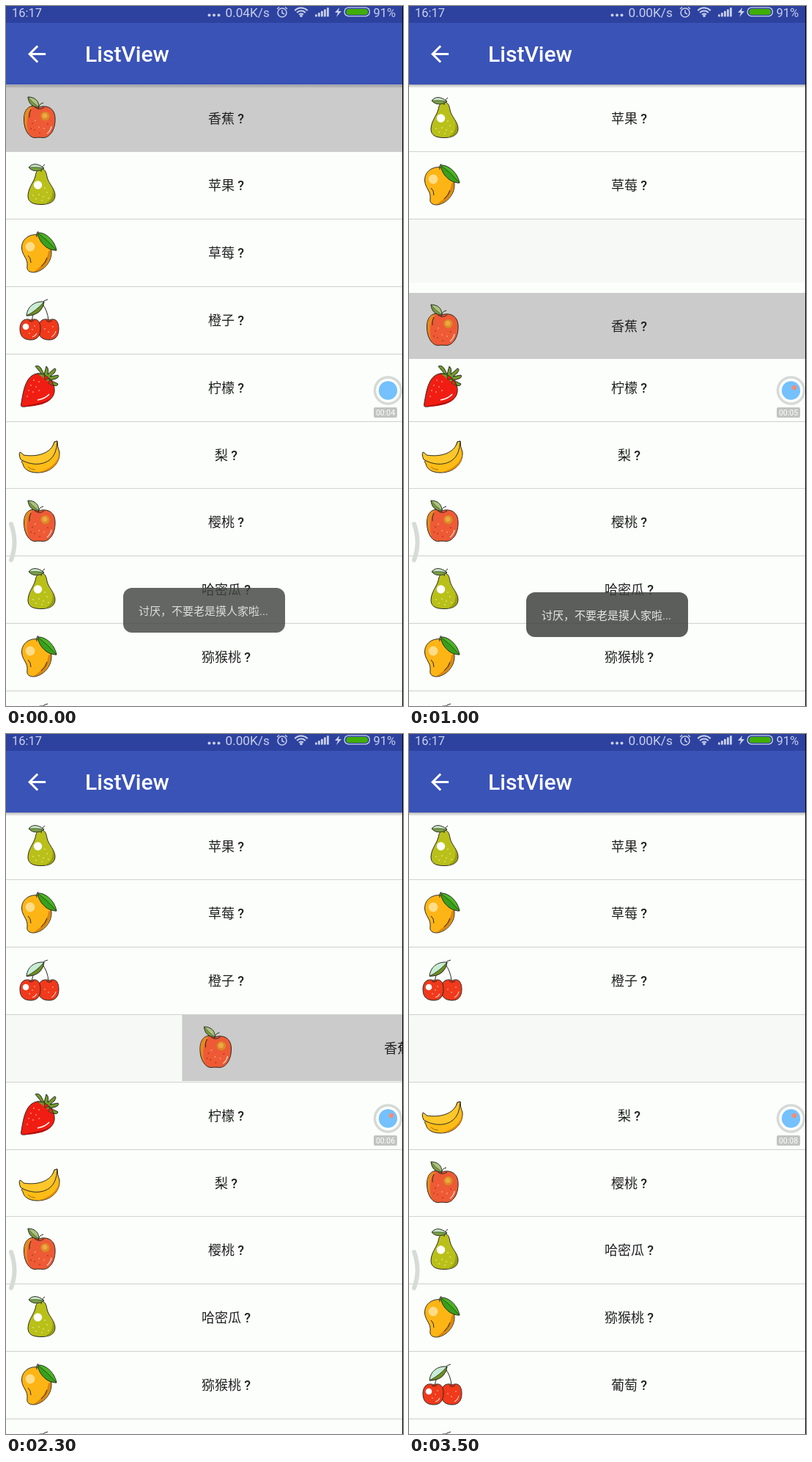
These frames come from a looping animation (542 px wide and 954 px high, 3.6 s). An HTML page with a canvas:

```html
<!DOCTYPE html>
<html lang="zh">
<head>
<meta charset="utf-8">
<style>
html, body { margin: 0; width: 542px; height: 954px; overflow: hidden; background: #f7f9f7; }
canvas { display: block; }
</style>
</head>
<body>
<canvas id="stage" width="542" height="954"></canvas>
<script>
const ctx = document.getElementById('stage').getContext('2d');
const LOOP = 3600, STEP = 100, WIDTH = 541, ROW = 91.8, TOP = 107;
const INK = '#2b2a22', PAPER = '#fcfefc', PRESSED = '#cacbca', STATUS = '#c9cfea';
const CJK = '"Noto Sans CJK SC", "Noto Sans CJK", sans-serif';

const clamp = u => Math.max(0, Math.min(1, u));
const ease = u => (1 - Math.cos(Math.PI * clamp(u))) / 2;
const progress = (t, start, length) => clamp((t - start) / length);
const slide = (t, start) => ease(progress(t, start, 250));

function keyframes(t, keys) {
  for (let i = 1; i < keys.length; i++) {
    const [t0, a] = keys[i - 1], [t1, b] = keys[i];
    if (t <= t1) return a + (b - a) * (t - t0) / (t1 - t0);
  }
  return keys[keys.length - 1][1];
}

function rect(x, y, w, h, color) {
  ctx.fillStyle = color;
  ctx.fillRect(x, y, w, h);
}

function pill(x, y, w, h, r, color) {
  ctx.beginPath();
  ctx.roundRect(x, y, w, h, r);
  ctx.fillStyle = color;
  ctx.fill();
}

function shape(d, fill, stroke = INK, width = 1) {
  const path = new Path2D(d);
  if (fill) {
    ctx.fillStyle = fill;
    ctx.fill(path);
  }
  if (stroke) {
    ctx.strokeStyle = stroke;
    ctx.lineWidth = width;
    ctx.stroke(path);
  }
}

function disc(x, y, r, fill, stroke, width = 1) {
  ctx.beginPath();
  ctx.arc(x, y, r, 0, 7);
  if (fill) {
    ctx.fillStyle = fill;
    ctx.fill();
  }
  if (stroke) {
    ctx.strokeStyle = stroke;
    ctx.lineWidth = width;
    ctx.stroke();
  }
}

function dots(color, ...points) {
  for (const [x, y] of points) disc(x, y, 0.8, color);
}

function text(s, x, y, font, color, align = 'left') {
  ctx.font = font;
  ctx.fillStyle = color;
  ctx.textAlign = align;
  ctx.fillText(s, x, y);
}

// Fruit pictures, with y measured from the top of the row.
function apple() {
  shape('M45 31C37 27 25 29 24.5 46C24 62 32 73 40 72.5C43 72 47 72 50 72.5C60 73 68 61 67 45C66 30 53 28 45 31Z', '#ee5a35');
  shape('M36 30.5C29 30 25 37 25 46C25 55 28 63 31 66C27 56 28 40 36 30.5Z', '#e58a22', null);
  shape('M34 34Q31 39 32 45M39 30.5Q45 36 52 31', null);
  shape('M44 33Q45 26 51 25', null);
  shape('M30 17C38 17 45 21 45 31C36 31 31 26 30 17Z', '#a9c47c');
  shape('M30 17Q36 25 45 31C37 31 31 26 30 17Z', '#7d9a45', INK, 0.6);
  disc(53.5, 43, 6.2, '#d98a25');
  disc(53, 42.5, 3.5, '#efa745');
  shape('M56 67Q61 63 62 57', null, '#ffd9cc', 1.3);
  dots('#8d2a18', [36, 53], [39, 62], [34, 60], [46, 66], [57, 54]);
  dots('#ffc0a0', [40, 49], [45, 58], [52, 60]);
}

function pear() {
  shape('M48 24C43 24 41 28 40 34C38 42 30 50 30 61C30 70 38 72.5 48 72.5C59 72.5 67 69 67 60C67 51 58 44 56 35C55 28 53 24 48 24Z', '#b9c019');
  shape('M63 50C70 62 65 72 51 72C62 69 65 61 63 50Z', '#969c10', null);
  shape('M48 28Q48 21 53 18', null);
  shape('M31 22C36 16 43 16 52 23C45 28 36 28 31 22Z', '#c9e8c6');
  shape('M31 22Q42 21 52 23C45 28 36 28 31 22Z', '#77a044', INK, 0.6);
  disc(43.5, 46, 5.7, '#ffffff');
  dots('#f2f3ae', [45, 59], [51, 62], [56, 56], [58, 64], [49, 67], [41, 65], [53, 50], [37, 60]);
}

function mango() {
  shape('M44 22C33 20 21 27 21.5 40C22 50 30 54 29 64C28 70 31 73 38 73C50 72 62 60 62 46C62 33 55 23 44 22Z', '#fdb515');
  shape('M61 42C62 58 50 72 37 72.5C48 66 57 56 58 44Z', '#db850e', null);
  shape('M30 50Q34 53 34 60M48 65Q54 60 56 53', null);
  shape('M42 25Q40 20 44 17', null);
  shape('M43 19C53 18 66 28 69 43C57 43 46 34 43 19Z', '#49b522');
  shape('M43 19Q56 28 69 43C57 43 46 34 43 19Z', '#38a01b', INK, 0.7);
  disc(33, 38, 6.4, '#ffdc87');
}

function cherry() {
  shape('M57 18Q51 19 49 23Q37 33 35 47M49 23Q57 33 58 47', null);
  shape('M28 40C29 28 38 20 52 21C50 34 41 40 28 40Z', '#c7ecd4');
  shape('M28 40Q42 33 52 21C50 34 41 40 28 40Z', '#6f8e25', INK, 0.8);
  const body = 'M59 46C52 43 44 46 44 58C44 70 51 73 59 73C67 73 72 68 72 58C72 46 66 43 59 46Z';
  shape(body, '#f1391b');
  ctx.save();
  ctx.translate(-25, 0);
  shape(body, '#f1391b');
  ctx.restore();
  shape('M31 47Q35 49 38 46.5M55 46.5Q59 50 63 46.5', null);
  disc(27, 55, 4.3, '#ffffff');
  shape('M62 69Q67 66 68 61M36 69Q40 68 42 64', null, '#ffc9b8', 1.2);
  dots('#ffd1b8', [36, 59], [32, 64], [53, 58], [58, 62], [64, 55], [39, 54]);
}

function strawberry() {
  shape('M53 33L40 17Q45 15 48 20L52 28L55 17Q59 20 57 28L66 20Q70 20 66 26L60 31L71 29Q73 32 68 34L61 36L71 41Q70 45 64 43L55 39Z', '#6f9a2c');
  shape('M42 27C28 30 24 46 20.5 70C20 73 25 72.5 32 71C47 69 64 66 66 52C68 39 54 25 42 27Z', '#f11d12');
  shape('M66 51C66 66 42 67 22 72C46 72 64 67 66 51Z', '#b90f0b', null);
  shape('M43 27L52 28L53 35L60 34L58 40L66 44', '#6f9a2c', INK, 0.8);
  shape('M43 63Q54 61 59 55', null, '#ffffff', 1.5);
  dots('#ffd9c8', [38, 36], [45, 38], [34, 43], [41, 45], [31, 50], [37, 52], [45, 50], [29, 58]);
}

function banana() {
  shape('M66 28L70 27Q70 35 73 42C74 59 60 70 43 70C30 70 24 64 23 58Q20 54 23 53C39 58 60 49 66 28Z', '#fdbc16');
  shape('M66 28L70 27Q69 46 59 53C46 62 30 58 20 52Q17 45 19 42Q22 43 24 46C42 49 62 44 66 28Z', '#fdc72b');
  shape('M72.5 46C73 59 60 69.5 44 69.5C59 66 69 58 72.5 46Z', '#dc8a0d', null);
  shape('M30 62Q34 66 40 66', null, '#9a650a', 0.9);
}

const pictures = [apple, pear, mango, cherry, strawberry, banana];
const names = ['香蕉', '苹果', '草莓', '橙子', '柠檬', '梨', '樱桃', '哈密瓜', '猕猴桃', '葡萄'];
const items = names.map((name, i) => ({ label: name + ' ?', draw: pictures[i % 6] }));
items.push({ label: '', draw: cherry });

const slotTop = slot => TOP + ROW * slot;

function drawRow(item, y, x = 0, color = PAPER) {
  ctx.save();
  ctx.translate(x, Math.floor(y));
  rect(0, 1, WIDTH, 90, color);
  item.draw();
  text(item.label, 300.5, 52.5, '500 18px Roboto, ' + CJK, '#1f201f', 'center');
  ctx.restore();
}

const dragPath = [[0, 107], [100, 125], [200, 175], [300, 230], [400, 272], [500, 302],
  [700, 345], [1000, 390], [1300, 412], [1500, 412], [1600, 404], [1700, 388], [1800, slotTop(3)]];
const swapTimes = [0, 200, 500, 960];

function drawList(t) {
  rect(0, TOP, WIDTH, 954 - TOP, '#f7f9f7');
  for (let k = 1; k < 10; k++) rect(0, Math.floor(slotTop(k)), WIDTH, 1, '#d0d3d0');

  const swipes = { 0: progress(t, 2100, 300) ** 2, 4: progress(t, 3100, 400) ** 2 };
  const collapse = slide(t, 2550);
  for (let i = items.length - 1; i > 0; i--) {
    const slot = i - (i < 4 ? slide(t, swapTimes[i]) : collapse);
    const x = (swipes[i] || 0) * WIDTH;
    if (x < WIDTH) drawRow(items[i], slotTop(slot), x, x ? PRESSED : PAPER);
  }
  if (swipes[0] < 1) {
    const held = t < 1800 || swipes[0] > 0;
    drawRow(items[0], keyframes(t, dragPath), swipes[0] * WIDTH, held ? PRESSED : PAPER);
  }
}

function drawStatus(t) {
  const font = '16.5px Roboto, sans-serif';
  rect(0, 0, WIDTH, 23, '#2d429f');
  text('16:17', 8, 15, font, STATUS);
  for (let i = 0; i < 3; i++) disc(277.5 + 6.5 * i, 12.5, 2, STATUS);
  text(t < 200 ? '0.04K/s' : '0.00K/s', 299.5, 15, '17.2px Roboto, sans-serif', STATUS);

  disc(377, 9, 6, null, STATUS, 1.5);
  shape('M377 5.5V9.5L380 11M370 4L373 1.5M384 4L381 1.5', null, STATUS, 1.5);
  for (const r of [4, 8, 12]) {
    ctx.beginPath();
    ctx.arc(403, 14.5, r, -Math.PI * 0.76, -Math.PI * 0.24);
    ctx.strokeStyle = STATUS;
    ctx.lineWidth = 2;
    ctx.stroke();
  }
  disc(403, 13.5, 1.8, STATUS);
  for (let i = 0; i < 5; i++) rect(422 + 4 * i, 11.5 - 2.3 * i, 2.8, 3 + 2.3 * i, STATUS);
  shape('M455 2L449 9H453L451 15L458 7H454Z', STATUS, null);

  pill(461.5, 1.5, 35.5, 13, 6, STATUS);
  pill(462.8, 2.8, 32.9, 10.4, 5, '#2d429f');
  pill(464.5, 4, 29.5, 8, 3.5, '#40ad08');
  text('91%', 501.5, 15, font, STATUS);
}

function drawHeader(t) {
  const shadow = ctx.createLinearGradient(0, TOP, 0, TOP + 5);
  shadow.addColorStop(0, 'rgba(0,0,0,.28)');
  shadow.addColorStop(1, 'rgba(0,0,0,0)');
  rect(0, TOP, WIDTH, 5, shadow);
  rect(0, 23, WIDTH, TOP - 23, '#3a53b7');
  drawStatus(t);
  ctx.save();
  ctx.translate(24, 47.4);
  ctx.scale(1.506, 1.506);
  shape('M20 11H7.83l5.59-5.59L12 4l-8 8 8 8 1.41-1.41L7.83 13H20v-2z', '#ffffff', null);
  ctx.restore();
  text('ListView', 108, 76, '500 30px Roboto, sans-serif', '#ffffff');
}

function drawOverlays(t) {
  ctx.lineCap = 'round';
  shape('M7 706Q16 731 7 755', null, '#d7dbd7', 6);
  ctx.lineCap = 'butt';

  disc(521.5, 524, 18, PAPER, '#d6dad6', 3.5);
  disc(521.5, 524, 12.7, '#74c1fd');
  const blinkOn = t >= 100 && !(t >= 1700 && t < 2200);
  if (blinkOn) disc(526, 520, 3.3, '#f38c74');
  pill(502, 547, 32, 14, 2, '#c1c4c1');
  const seconds = 4 + Math.floor((t + 100) / 900);
  text('00:0' + seconds, 518, 557.8, '10.5px Roboto, sans-serif', '#ffffff', 'center');
}

function drawToast(t) {
  const y = 793 + 6 * ease(t / 300);
  ctx.globalAlpha = (t < 100 ? 0.95 : 1) * (1 - ease(progress(t, 1350, 450)));
  pill(160, y, 221, 61, 12, 'rgba(66,68,66,.86)');
  text('讨厌，不要老是摸人家啦...', 181, y + 36.5, '15px Roboto, ' + CJK, '#e4e6e4');
  ctx.globalAlpha = 1;
}

function render(t) {
  drawList(t);
  drawHeader(t);
  drawOverlays(t);
  drawToast(t);
  rect(WIDTH, 0, 1, 954, '#000000');
}

const start = performance.now();
function tick() {
  const t = (performance.now() - start) % LOOP;
  render(Math.floor(t / STEP) * STEP);
  requestAnimationFrame(tick);
}
tick();
</script>
</body>
</html>
```
